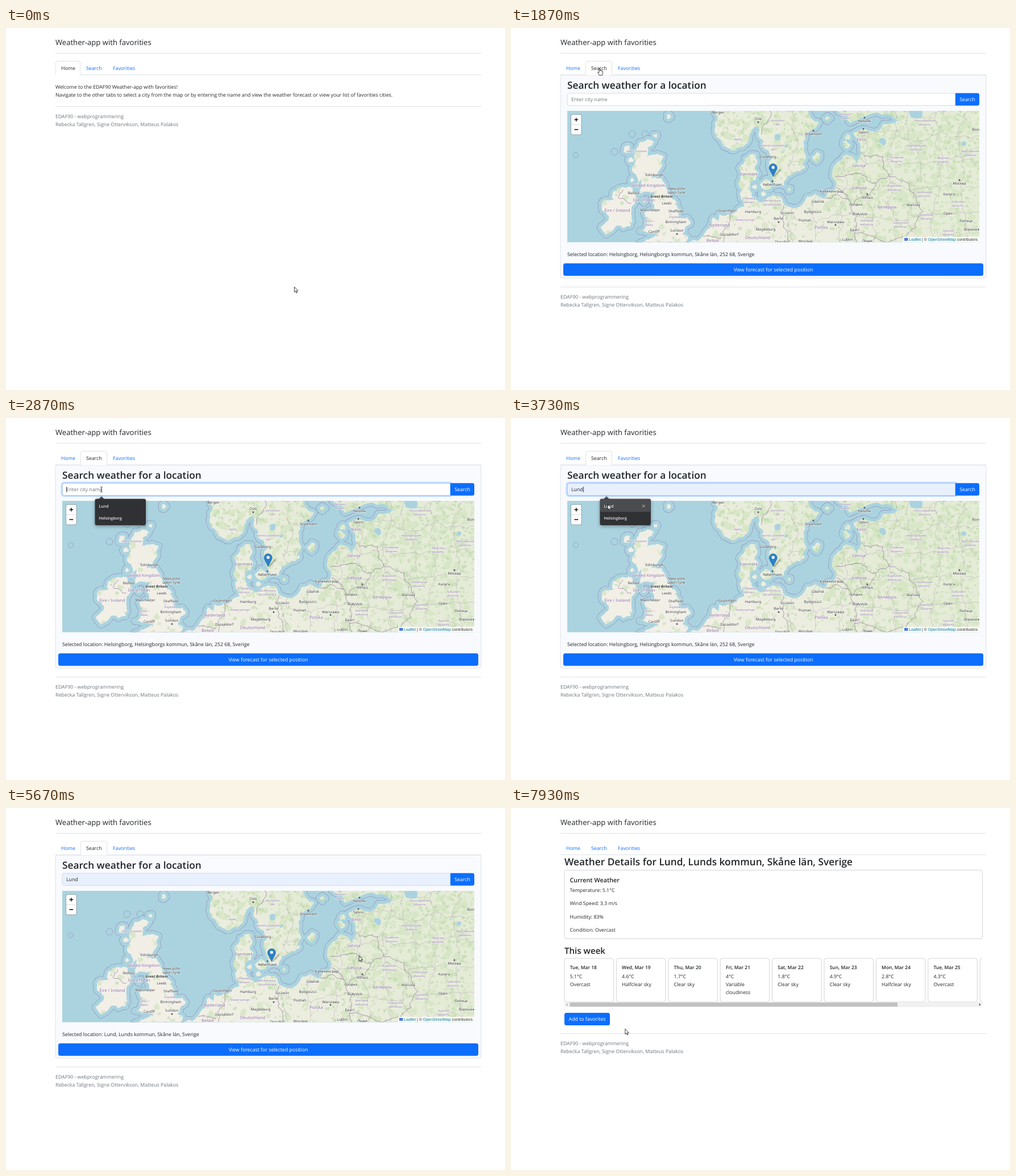
Write an HTML page that moves like this. It is 878x638 px and loops after 8000 ms.

```html
<!DOCTYPE html>
<html lang="en">
<head>
<meta charset="utf-8">
<title>Weather-app with favorities</title>
<style>
html, body { margin: 0; width: 100%; height: 100%; overflow: hidden; background: #fff; }
svg { display: block; }
#stage { width: 878px; height: 638px; font: 8.78px 'Open Sans', sans-serif; fill: #212529; text-rendering: geometricPrecision; }
.semi { font-weight: 600; }
.line { fill: none; stroke: #dee2e6; }
.link { fill: #0d6efd; }
.white { fill: #fff; }
.muted { fill: #6c757d; }
#map text { font-family: 'Noto Sans', sans-serif; text-anchor: middle; paint-order: stroke; stroke: #fffa; stroke-width: 1.3px; }
#map .city { font-size: 6.3px; fill: #333; }
#map .country { font-size: 7.5px; fill: #8a6a9c; }
#map .region { font-size: 5.3px; font-style: italic; fill: #8d73a0; }
#map .isle { font-size: 6.4px; font-style: italic; font-weight: 600; fill: #333; }
.credit { font: 6.94px 'Liberation Sans', Arial, sans-serif; }
#menu { filter: drop-shadow(0 2px 3px #0005); }
</style>
</head>
<body>
<svg id="stage" viewBox="0 0 878 638"></svg>
<script>
const text = (x, y, str, attrs = '') => `<text x="${x}" y="${y}" ${attrs}>${str}</text>`;
const rect = (x, y, w, h, attrs = '') => `<rect x="${x}" y="${y}" width="${w}" height="${h}" ${attrs}/>`;
const path = (d, attrs = '') => `<path d="${d}" ${attrs}/>`;
const group = (id, body) => `<g id="${id}">${body}</g>`;
const mid = 'text-anchor="middle"';
const semi = size => `class="semi" font-size="${size}"`;

let seed = 7;
const rnd = () => (seed = seed * 16807 % 2147483647) / 2147483647;

// ---- Map: key points as "longitude,latitude" in Mercator projection ----
const project = (lon, lat) => [
  293.3 + 13.17 * lon,
  1158.1 - 754.6 * Math.log(Math.tan(Math.PI / 4 + lat * Math.PI / 360))
];
const parse = str => str.split(' ').map(p => p.split(',').map(Number));
const points = str => parse(str).map(p => project(...p));
const toPath = pts => 'M' + pts.map(p => p.map(v => v.toFixed(1))).join('L');

// Midpoint displacement makes a natural line out of a few points
function rough(pts, rounds = 3) {
  for (; rounds; rounds--) {
    pts = pts.flatMap((a, i) => {
      const b = pts[i + 1] || a, dx = b[0] - a[0], dy = b[1] - a[1], len = Math.hypot(dx, dy);
      const k = (rnd() - .5) * .4;
      return len > 4 && len < 100 ? [a, [(a[0] + b[0]) / 2 - dy * k, (a[1] + b[1]) / 2 + dx * k]] : [a];
    });
  }
  return toPath(pts);
}
const coast = str => {
  const pts = points(str);
  return rough([...pts, pts[0]]) + 'Z';
};

function blob(x, y, r, low = .7) {
  const pts = [];
  for (let i = 0; i < 8; i++) {
    const q = r * (low + rnd() * .8);
    pts.push([x + q * Math.cos(i * .785), y + q * Math.sin(i * .785)]);
  }
  return toPath(pts) + 'Z';
}
const blobs = str => parse(str).map(([lon, lat, r]) => blob(...project(lon, lat), r)).join('');

const britain = '-5,58.6 -3.1,58.6 -4.2,57.55 -1.9,57.6 -2.7,56.3 -3.5,56 -2.1,55.9 -1.4,55 -.1,54.1 .2,53.4 .1,52.9 1.3,52.9 1.75,52.5 .7,51.5 1.4,51.3 .9,50.7 -4,50.3 -5.6,50.1 -4.2,51.1 -2.6,51.6 -5.1,51.8 -4.1,52.4 -4.5,53.3 -3,53.4 -3.4,54.5 -3.2,54.95 -5,54.8 -4.9,55.9 -5.6,55.4 -6.1,56.7 -5.7,57.8';
const ireland = '-7.3,55.3 -6,55.2 -5.5,54.5 -6.1,53.8 -6.3,52.2 -9.6,51.5 -10.3,52.1 -9.2,53 -10.1,53.5 -10,54.2 -8.6,54.3 -8.5,55';
const continent = '1.5,50 1.6,50.9 3.4,51.4 4.7,52.9 5.4,52.6 5.5,53.2 8.9,53.8 8.6,55 8.1,55.6 8.2,56.7 10.5,57.7 10.3,56.7 10.8,56.3 9.7,55.6 9.9,54.8 11,54.1 13.4,54.6 14.3,53.9 18.4,54.8 19.4,54.4 21.1,55.2 21.1,57 22.6,57.7 24,57 24.4,58.4 23.5,59.2 29,59.9 30.2,60 28,60.5 23,59.9 21.3,60.7 21.3,61.2 45,61.2 45,50';
const scandinavia = '17.2,61.3 17.3,60.7 18.9,59.9 16.8,58.6 16.4,56.5 14.6,56.1 14.2,55.4 12.9,55.4 12.5,56.2 11.3,58.4 10.7,59.7 9.6,58.9 7.2,58 5.6,58.8 5,60.5 4.9,61.3';
const land = [britain, ireland, continent, scandinavia].map(coast).join('') +
  blobs('-6.8,58.1,6 -6.2,57.3,4 -6.1,55.8,3 -3,59,3 -1.2,60.3,4 -4.5,54.2,2.5 11.8,55.5,8 10.3,55.3,5 11.5,54.75,4 14.9,55.1,2.5 18.6,57.5,6 16.7,56.8,3 22.5,58.4,6 22.7,58.9,4 20,60.2,4');
const lakes = blobs('13.3,58.9,6 14.5,58.3,3 27.5,58.6,6 31.8,60.6,12 35.5,60.9,7 38.2,58.5,4');

const borders = [
  '11.2,59.1 12.5,60.4 12.3,61', '7,53.3 7,52.6 6.1,51.8 6,50.8', '3.4,51.35 5.8,51.2', '14.2,53.9 14.7,51.6 15,50.9',
  '19.7,54.45 22.8,54.36 21.2,55.25', '22.8,54.36 23.9,53 23.6,51.5 24,50.8', '23.5,53.9 25.8,54.9 26.6,55.65 24.5,56.3 21.1,56.1',
  '26.6,55.65 28.2,56.1 27.4,57.55 24.4,57.9', '28.2,56.1 30.9,55.6 32.7,53.4 31.8,52.1 30.5,51.3 23.6,51.6', '-7.3,55.1 -8,54.5 -6.2,54.05'
].map(b => rough(points(b))).join('');

// Provinces: a jittered grid of rough lines, east of the Oder
function provinces() {
  const node = [], jitter = v => v + (rnd() - .5) * 24;
  let d = '';
  for (let i = 0; i < 9; i++) {
    node.push([]);
    for (let j = 0; j < 6; j++) {
      const here = node[i][j] = [jitter(500 + i * 42), jitter(140 + j * 48)];
      if (i) d += rough([node[i - 1][j], here]);
      if (j) d += rough([node[i][j - 1], here]);
    }
  }
  return d;
}

function forest(count, size) {
  let d = '';
  for (let i = 0; i < count; i++) {
    const lon = -11 + rnd() * 52, lat = 50.7 + rnd() * 10.2;
    const density = lon < 4 ? .15 : .15 + (lat - 51) * .08 + (lon > 20 ? .2 : 0);
    if (rnd() < density) d += blob(...project(lon, lat), size * (.4 + rnd()), .4);
  }
  return d;
}

// "text,x,y" entries; ~ breaks a line, a fourth value is the offset of the town dot
const labels = (cls, list) => list.split(';').map(entry => {
  const [name, x, y, dy] = entry.split(',');
  return name.split('~').map((row, i) => text(x, +y + 2.2 + i * 6.5, row, `class="${cls}"`)).join('') +
    (dy ? `<circle cx="${x}" cy="${+y + +dy}" r="1.5" fill="#555"/>` : '');
}).join('');

const loop = (x, y, r) => `<circle cx="${x}" cy="${y}" r="${r}"/>`;
const map = `<clipPath id="shore">${path(land)}</clipPath>
<linearGradient id="ground" gradientUnits="userSpaceOnUse" x1="330" y1="377" x2="560" y2="146"><stop stop-color="#f2efe7"/><stop offset="1" stop-color="#e4ebd6"/></linearGradient>
<svg id="map" x="99" y="146" width="725" height="231.5" viewBox="99 146 725 231.5">` +
  rect(99, 146, 725, 232, 'fill="#aad3df"') +
  `<g fill="none" stroke="#8f86b4" stroke-width=".6">${loop(114, 224, 4.5) + loop(182, 218, 6) + loop(213, 187, 6) + loop(236, 187, 6)}</g>` +
  `<g fill="none" stroke-linejoin="round">${path(land, 'stroke="#8f86b4" stroke-width="13.2"') + path(land, 'stroke="#aad3df" stroke-width="12"')}</g>` +
  path(land, 'fill="url(#ground)"') +
  `<g clip-path="url(#shore)">${path(forest(1700, 6), 'fill="#d3e5c0" opacity=".75"') + path(forest(2200, 2.6), 'fill="#b9d8a8" opacity=".6"') +
    path(provinces(), 'fill="none" stroke="#a487ad" stroke-width=".6" opacity=".6"')}</g>` +
  path(lakes, 'fill="#aad3df"') +
  path(borders, 'fill="none" stroke="#94749f" stroke-width=".9" opacity=".8"') +
  labels('region', 'Värmlands~län,469,163;Agder,399,196;Västra Götalands~län,461,207;Varsinais-~Suomi,588,152;Ленинградская~область,728,163;Новгородская~область,713,207;Псковская~область,678,228;Тверская~область,760,229;Ярославская~область,808,217;Віцебская~вобласць,674,278;Смоленская~область,727,289;Тульская~область,786,306;Брянская~область,731,329;Курская~область,770,357;Гомельская~вобласць,685,343;Брэсцкая~вобласць,626,339;Niedersachsen,412,338;Schleswig-~Holstein,419,300;Mecklenburg-~Vorpommern,460,304;Cymru /~Wales,243,340;England,288,333;Alba / Scotland,221,217') +
  labels('country', 'Eesti,617,197;Latvija,612,243;Lietuva,613,282;Беларусь,662,316;Polska,546,352;Deutschland,434,370;Danmark,418,258;Nederland,367,348;België,355,375;Isle of Man,234,304;United Kingdom,242,278;Éire / Ireland,187,322') +
  labels('isle', 'Great Britain,265,297') +
  labels('city', 'Bergen,365,149;Oslo,435,160,6;Stockholm,532,187,-6;Göteborg,452,227;Helsinki,622,164,-6;Tallinn,620,184,-6;Волог,820,179;Vilnius,627,299,-6;Калининград,564,288;Москва,789,274,-6;Калуга,771,293;Гродна,607,311;Магілёў,708,312;Орёл,769,327;Липецк,801,340;Воронеж,811,355;Брэст,605,356;Białystok,614,328;Warszawa,571,342,5;Poznań,517,339;Bydgoszcz,531,324;Gdańsk,540,306;Szczecin,486,326;Berlin,471,336,6;Hamburg,426,324;Magdeburg,448,355;Dresden,477,377;Wrocław,518,376;Lublin,592,373;Луцьк,627,375;København,460,276,-6;Groningen,381,322;Düsseldorf,384,364;London,292,357,6;Birmingham,290,342;Sheffield,290,323;Leeds,274,309;Manchester,245,321;Belfast,216,291;Edinburgh,252,259;Newcastle~upon-Tyne,291,283;Cardiff,252,359') +
  '</svg>';

const pin = group('pin',
  path('M0 0L11-13Q15-15 13-10L3 0Z', 'fill="#000" opacity=".22"') +
  path('M0 0L-6.2-12.5A7 7 0 1 1 6.2-12.5Z', 'fill="#2b82cb" stroke="#2e6c97" stroke-width=".7"') +
  '<circle cy="-16.3" r="2.6" class="white"/>');

// ---- Pages ----
const hr = y => rect(87, y, 749, 1, 'fill="#e1e2e3"');
const tabShape = (x, w) => `M${x + .5} 82.5V62a3.5 3.5 0 0 1 3.5-3.5H${x + w - 4}a3.5 3.5 0 0 1 3.5 3.5V82.5`;
const tabBoxes = [[87, 44], [131, 47]];
function tabs(active) {
  const [x, w] = tabBoxes[active] || [];
  return (w ? path(tabShape(x, w), 'class="line" style="fill:#fff"') + rect(x + 1, 82, w - 2, 1, 'class="white"') : '') +
    ['Home', 'Search', 'Favorities'].map((name, i) => text([97, 141, 188][i], 74, name, i === active ? '' : 'class="link"')).join('');
}

const home = group('page0',
  path(tabShape(...tabBoxes[1]), 'id="tabHover" fill="none" stroke="#e9ecef"') + tabs(0) +
  text(87, 107, 'Welcome to the EDAF90 Weather-app with favorities!') +
  text(87, 121, 'Navigate to the other tabs to select a city from the map or by entering the name and view the weather forecast or view your list of favorities cities.'));

const inputShape = 'M781.6 115V136.5H102.5a3.5 3.5 0 0 1-3.5-3.5V118.5a3.5 3.5 0 0 1 3.5-3.5Z';
const buttonShape = 'M782 114.7H820.5a3.5 3.5 0 0 1 3.5 3.5V133.2a3.5 3.5 0 0 1-3.5 3.5H782Z';
const viewButton = attrs => rect(92, 414.7, 739, 22, 'rx="3.5" ' + attrs);
const search = group('page1',
  rect(87, 83, 749, 358, 'rx="3.5" fill="#f8fafd" stroke="#dee2e6"') + tabs(1) +
  text(99, 106.5, 'Search weather for a location', semi(17.3)) +
  path(inputShape, 'id="ring" fill="none" stroke="#c2dbff" stroke-width="5"') +
  path(inputShape, 'id="input" stroke-width=".8"') +
  path(buttonShape, 'fill="#0d6efd"') + path(buttonShape, 'id="searchHover" fill="#0b5ed7"') +
  text(803, 129, 'Search', mid + ' class="white"') +
  text(106, 129, '', 'id="query"') + rect(0, 121, .8, 10, 'id="caret"') +
  map + pin +
  rect(105.5, 152.5, 18.5, 35.5, 'rx="2.5" class="white" stroke="#0004" stroke-width="1.1"') +
  rect(106, 170, 17.5, .6, 'fill="#ccc"') +
  path('M111.5 161.5H118.1M114.8 158.2V164.8M111.5 179H118.1', 'stroke="#000" stroke-width="1.3"') +
  rect(690, 368, 134, 9.5, 'fill="#fffc"') + rect(692, 370, 6.5, 5, 'fill="#4c7be1"') +
  `<text x="821" y="375" text-anchor="end" class="credit" fill="#333"><tspan fill="#0078a8">Leaflet</tspan> | © <tspan fill="#0078a8">OpenStreetMap</tspan> contributors</text>` +
  text(99, 402, '', 'id="place"') +
  viewButton('fill="#0d6efd"') + viewButton('id="viewHover"') +
  text(461.5, 429, 'View forecast for selected position', mid + ' class="white"') +
  group('menu',
    path('M163 143L168 138L173 143Z', 'fill="#4a4c50"') + rect(156.5, 142.5, 89.5, 46.5, 'rx="3" fill="#303134"') +
    group('pick', rect(157, 143, 88.5, 22.5, 'rx="2.5" fill="#4a4c50"') + path('M231 153L235.5 157.5M235.5 153L231 157.5', 'stroke="#ccc" stroke-width=".9"')) +
    text(163.5, 158, 'Lund', semi(7) + ' fill="#e8eaed"') + text(163.5, 178.7, 'Helsingborg', semi(7) + ' fill="#e8eaed"')));

const days = [
  ['Tue', '5.1', 'Overcast'], ['Wed', '4.6', 'Halfclear sky'], ['Thu', '1.7', 'Clear sky'], ['Fri', '4', 'Variable', 'cloudiness'],
  ['Sat', '1.8', 'Clear sky'], ['Sun', '4.9', 'Clear sky'], ['Mon', '2.8', 'Halfclear sky'], ['Tue', '4.3', 'Overcast'], ['Wed', '']
];
const card = 'rx="3.5" class="white" stroke="#d3d4d5"';
const details = group('page2', tabs() +
  text(94, 101, 'Weather Details for Lund, Lunds kommun, Skåne län, Sverige', semi(17.3)) +
  rect(94, 109.5, 735.5, 121, card) + text(103.5, 131, 'Current Weather', semi(10.8)) +
  ['Temperature: 5.1°C', 'Wind Speed: 3.3 m/s', 'Humidity: 83%', 'Condition: Overcast'].map((s, i) => text(103.5, 148.3 + i * 23.15, s)).join('') +
  text(94, 257, 'This week', semi(15.1)) +
  '<svg x="93" y="262" width="736.5" height="82" viewBox="93 262 736.5 82">' +
  days.map(([day, temp, ...sky], i) => {
    const x = 94 + i * 91.4;
    return rect(x, 265, 86.5, 76.5, card) + text(x + 9.7, 283.7, `${day}, Mar ${18 + i}`, semi(8.45)) +
      (temp && text(x + 9.7, 300.3, temp + '°C')) + sky.map((s, j) => text(x + 9.7, 314.3 + j * 13.9, s)).join('');
  }).join('') + '</svg>' +
  rect(94, 341.5, 735.5, 9.5, 'fill="#f1f1f1"') + rect(103.5, 342.8, 576.5, 7.2, 'fill="#c1c1c1"') +
  path('M99.5 344.5V348.5L97 346.5Z', 'fill="#a3a3a3"') + path('M823.8 344.2V348.8L826.5 346.5Z', 'fill="#505050"') +
  rect(94, 361, 80, 22, 'rx="3.5" fill="#0d6efd"') + text(134, 375.2, 'Add to favorites', mid + ' class="white"'));

const footer = group('footer', hr(138) +
  text(87, 158.7, 'EDAF90 - webprogrammering', 'class="muted"') +
  text(87, 172.6, 'Rebecka Tallgren, Signe Ottervikson, Matteus Palakos', 'class="muted"'));

const cursors = `<g id="cursor" stroke="#111" stroke-width=".8" stroke-linejoin="round" class="white">` +
  path('M.4.3V9.6L2.5 7.7L3.9 11L5.4 10.4L4 7.2H6.9Z', 'id="arrow"') +
  path('M-1 1Q0-.6 1 1V4.4Q2 0 2.6 4.6Q3.6 3.6 4.2 5Q5.4 4.3 5.5 6V8.5L4.6 12.2H-.8L-3.2 7.6Q-3.4 5.8-1 7.4Z', 'id="hand"') +
  path('M-1.8-4.5Q0-4.5 0-3.5Q0-4.5 1.8-4.5M0-3.5V3.5M-1.8 4.5Q0 4.5 0 3.5Q0 4.5 1.8 4.5', 'id="beam" fill="none"') + '</g>';

const stage = document.getElementById('stage');
stage.innerHTML = rect(0, 0, 878, 638, 'class="white"') + text(87, 30.3, 'Weather-app with favorities', 'font-size="13.1"') +
  hr(44) + path('M87 82.5H836', 'class="line"') + home + search + details + footer + cursors;

// ---- Timeline ----
const $ = id => document.getElementById(id);
const show = (id, on) => $(id).style.display = on ? '' : 'none';
const set = (id, name, value) => $(id).setAttribute(name, value);
const ramp = (t, start, length) => Math.min(1, Math.max(0, (t - start) / length));
const fade = (t, start) => ramp(t, start, 150);

// Pointer trips: start, duration, destination
const trips = [[0, 867, 149, 95], [867, 466, 156, 71], [1867, 133, 161.5, 90], [2000, 333, 168, 126],
  [3067, 466, 170, 152], [3733, 867, 799.5, 129], [5267, 866, 395.5, 426], [7533, 400, 200.5, 389]];
const kinds = [[0, 'arrow'], [1060, 'hand'], [1930, 'beam'], [3260, 'arrow'], [4200, 'beam'], [4500, 'hand'], [5330, 'arrow'], [6000, 'hand'], [6530, 'arrow']];

function pointer(t) {
  let x = 507, y = 456;
  for (const [start, length, toX, toY] of trips) {
    const p = ramp(t, start, length), e = p * p * (3 - 2 * p);
    x += (toX - x) * e;
    y += (toY - y) * e;
  }
  return [x, y];
}

function draw(t) {
  const page = t < 1866 ? 0 : t < 6660 ? 1 : 2;
  for (let i = 0; i < 3; i++) show('page' + i, i === page);
  set('footer', 'transform', `translate(0 ${[0, 318, 259][page]})`);
  set('tabHover', 'opacity', fade(t, 1000));

  const filled = t > 3260, found = t > 5060, focus = fade(t, 2660) - fade(t, 4800);
  set('ring', 'opacity', focus);
  set('input', 'fill', filled ? '#e8f0fe' : '#fff');
  set('input', 'stroke', focus > .5 ? '#86b7fe' : '#ced4da');
  $('query').textContent = filled ? 'Lund' : 'Enter city name';
  set('query', 'class', filled ? '' : 'muted');
  show('caret', t > 2730 && t < 4860);
  set('caret', 'x', filled ? 127 : 106);
  show('menu', t > 2790 && t < 3795);
  show('pick', filled);
  set('searchHover', 'opacity', fade(t, 4460) - fade(t, 5270));
  set('viewHover', 'opacity', fade(t, 5900));
  set('viewHover', 'fill', t > 6460 ? '#0a58ca' : '#0b5ed7');
  $('place').textContent = 'Selected location: ' + (found ? 'Lund, Lunds kommun, Skåne län, Sverige' : 'Helsingborg, Helsingborgs kommun, Skåne län, 252 68, Sverige');
  set('pin', 'transform', `translate(${found ? project(13.22, 55.71) : project(12.75, 56.08)})`);

  const kind = kinds.filter(k => k[0] <= t).pop()[1];
  for (const k of ['arrow', 'hand', 'beam']) show(k, k === kind);
  set('cursor', 'transform', `translate(${pointer(t)})`);
}

// Time advances in steps of 1/15 second
function tick() {
  const t = performance.now() % 8000;
  draw(Math.min(7999, Math.floor((t + 4) * .015) / .015));
  requestAnimationFrame(tick);
}
tick();
</script>
</body>
</html>
```
